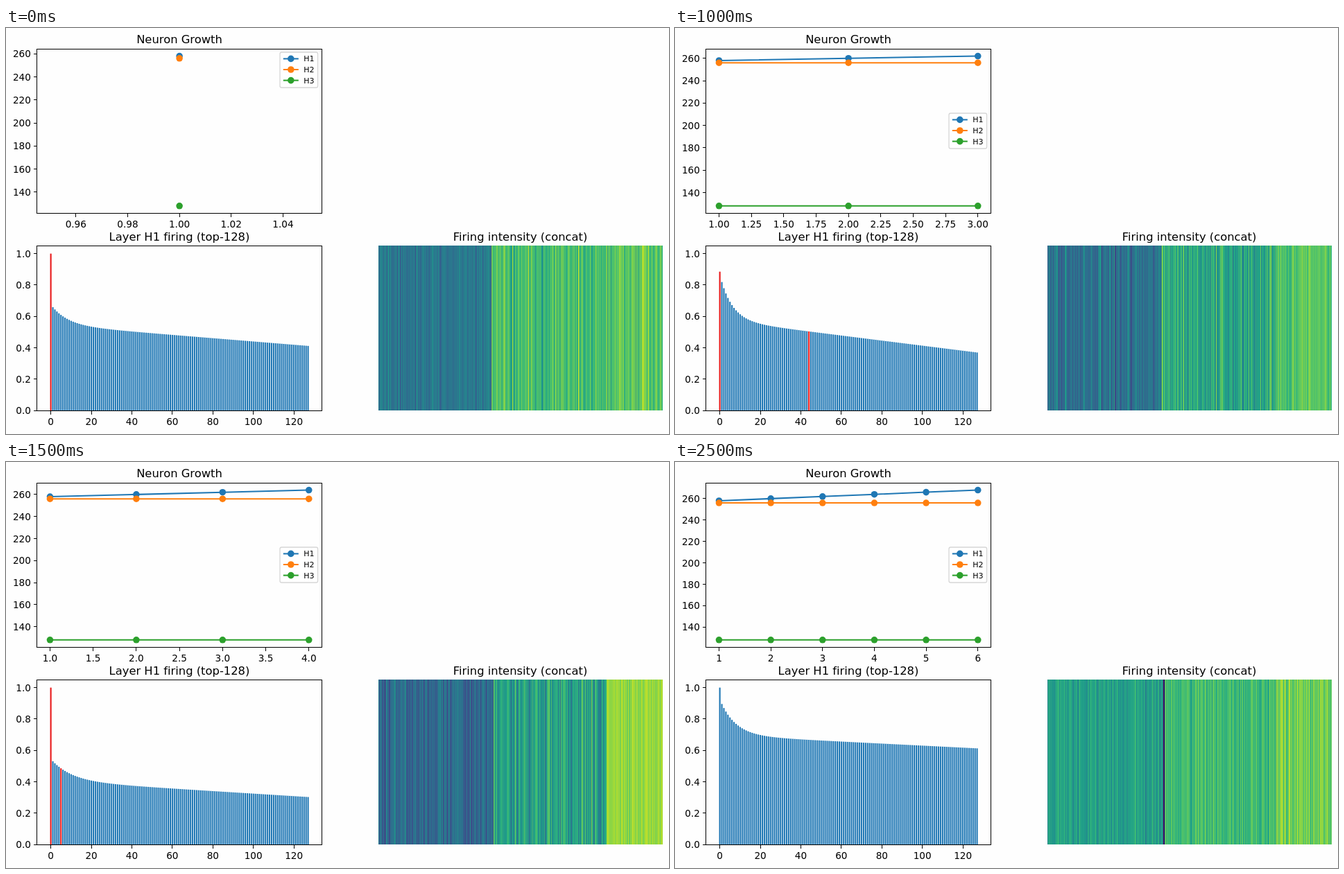
Animation of 956x586 px, one loop 3000 ms. Source, as an HTML page:

```html
<!DOCTYPE html>
<html lang="en">
<head>
<meta charset="utf-8">
<title>Neuron growth</title>
<style>
  html, body { margin: 0; width: 100%; height: 100%; overflow: hidden; background: #fefefe; }
  #stage { position: relative; width: 956px; height: 586px; overflow: hidden; }
  #strip { display: flex; width: 5736px; animation: play 3s steps(6, end) infinite; }
  svg { flex: none; display: block; overflow: hidden; }
  text { font-family: "DejaVu Sans", sans-serif; font-size: 13.6px; font-variant-ligatures: none; }
  .title { font-size: 16.35px; text-anchor: middle; }
  .mid { text-anchor: middle; }
  .end { text-anchor: end; }
  .key { font-size: 11px; }
  .axis { fill: none; stroke: #000; stroke-width: 1.1; }
  .crisp { shape-rendering: crispEdges; }
  @keyframes play { to { transform: translateX(-5736px); } }
</style>
</head>
<body>
<div id="stage"><div id="strip"></div></div>
<script>
const LEFT = 44.8, WIDTH = 410.6, HEIGHT = 237.9;
const BLUE = '#1f77b4', RED = '#e8191a';
const COLORS = [BLUE, '#ff7f0e', '#2ca02c'];
const VIRIDIS = ['440154', '482878', '3e4a89', '31688e', '26828e',
                 '1f9e89', '35b779', '6ece58', 'b5de2b', 'fde725']
  .map(h => [0, 2, 4].map(i => parseInt(h.substr(i, 2), 16)));

// bars: first bar, then a line from start to end plus a decaying boost
// layers: mean and spread of the firing; fresh: firing of the two newest neurons
const STEPS = [
  { bars: { first: 1, start: .545, end: .412, boost: .13, decay: 8 }, red: [0],
    layers: [[.4, .055], [.69, .075], [.73, .08]], fresh: .78 },
  { bars: { first: 1, start: .63, end: .455, boost: .28, decay: 4 }, red: [],
    layers: [[.45, .1], [.65, .095], [.69, .1]], fresh: .02 },
  { bars: { first: .885, start: .575, end: .37, boost: .29, decay: 6 }, red: [0, 44],
    layers: [[.38, .08], [.6, .09], [.73, .05]], fresh: .85 },
  { bars: { first: 1, start: .405, end: .303, boost: .14, decay: 10 }, red: [0, 5],
    layers: [[.33, .075], [.57, .1], [.84, .04]], fresh: .75 },
  { bars: { first: .98, start: .66, end: .52, boost: .335, decay: 17 }, red: [],
    layers: [[.5, .08], [.63, .08], [.7, .08]], fresh: .1 },
  { bars: { first: 1, start: .695, end: .613, boost: .23, decay: 7.5 }, red: [],
    layers: [[.565, .06], [.685, .065], [.78, .06]], fresh: .03 }
];

const n2 = v => +v.toFixed(2);
const text = (s, x, y, cls) => `<text x="${n2(x)}" y="${n2(y)}" class="${cls}">${s}</text>`;
const line = (d, color) => `<path d="${d}" fill="none" stroke="${color}" stroke-width="2.05"/>`;
const dot = (x, y, color) => `<circle cx="${n2(x)}" cy="${n2(y)}" r="4.78" fill="${color}"/>`;
const layerSizes = k => [258 + 2 * k, 256, 128];

// Smallest round step that gives at most nine intervals
function ticks(lo, hi) {
  let step;
  for (let p = .01; !step; p *= 10) step = [1, 2, 2.5, 5].map(m => m * p).find(s => (hi - lo) / s <= 9);
  const digits = (String(n2(step)).split('.')[1] || '').length;
  const out = [];
  for (let i = Math.ceil(lo / step); i * step <= hi; i++) out.push([i * step, (i * step).toFixed(digits)]);
  return out;
}

function plot(title, top, [x0, x1], [y0, y1]) {
  const bottom = top + HEIGHT, base = Math.floor(bottom) + .5, roof = Math.ceil(top) - .5 + (top < 100);
  const X = v => LEFT + (v - x0) / (x1 - x0) * WIDTH;
  const Y = v => bottom - (v - y0) / (y1 - y0) * HEIGHT;
  let axes = text(title, 250, top + 7.6 < 100 ? 22 : 306.7, 'title');
  for (const [v, label] of ticks(x0, x1)) {
    axes += `<path class="axis crisp" d="M${Math.floor(X(v)) + .5} ${base}v5"/>` + text(label, X(v), base + 20.9, 'mid');
  }
  for (const [v, label] of ticks(y0, y1)) {
    axes += `<path class="axis crisp" d="M44.5 ${Math.floor(Y(v)) + .5}h-5"/>` + text(label, 35.9, Y(v) + 5.1, 'end');
  }
  axes += `<rect class="axis crisp" x="44.5" y="${roof}" width="411" height="${base - roof}"/>`;
  return { X, Y, axes };
}

function legend(top) {
  let out = `<rect x="395" y="${top}" width="54.6" height="51" rx="2.6" fill="#fff" fill-opacity=".8" stroke="#ccc" stroke-opacity=".8" stroke-width="1.3"/>`;
  COLORS.forEach((c, i) => {
    const y = top + 9.4 + i * 15.6;
    out += line(`M399.8 ${y}H421.8`, c) + dot(410.8, y, c) + text('H' + (i + 1), 429.3, y + 4, 'key');
  });
  return out;
}

function growth(k) {
  const max = 258 + 2 * k, pad = (max - 128) * .05, side = k ? .05 * k : .055;
  const { X, Y, axes } = plot('Neuron Growth', 29.7, [1 - side, 1 + k + side], [128 - pad, max + pad]);
  let out = axes;
  COLORS.forEach((color, s) => {
    const pts = Array.from({ length: k + 1 }, (_, i) => [n2(X(i + 1)), n2(Y(layerSizes(i)[s]))]);
    if (k) out += line('M' + pts.join('L'), color);
    out += pts.map(p => dot(...p, color)).join('');
  });
  return out + legend(k ? 123 : 35);
}

function firing({ bars, red }) {
  const { X, Y, axes } = plot('Layer H1 firing (top-128)', 314.3, [-6.79, 133.79], [0, 1.05]);
  const { first, start, end, boost, decay } = bars;
  let out = '';
  for (let i = 0; i < 128; i++) {
    const h = i ? start + (end - start) * i / 127 + boost * Math.exp(-i / decay) : first;
    out += `<rect x="${n2(X(i) - 1.05)}" y="${n2(Y(h))}" width="2.1" height="${n2(Y(0) - Y(h))}" fill="${red.includes(i) ? RED : BLUE}"/>`;
  }
  return out + axes;
}

function random(seed) {
  return () => {
    seed = (seed * 1664525 + 1013904223) >>> 0;
    return seed / 4294967296;
  };
}

function viridis(v) {
  const p = Math.min(.9999, Math.max(0, v)) * 9, i = Math.floor(p);
  return `rgb(${VIRIDIS[i].map((c, j) => Math.round(c + (VIRIDIS[i + 1][j] - c) * (p - i)))})`;
}

function intensity({ layers, fresh }, k) {
  const rnd = random(977 * k + 41);
  const noise = () => (rnd() + rnd() + rnd() + rnd() - 2) * 1.73;
  const [h1, h2, h3] = layerSizes(k);
  let out = text('Firing intensity (concat)', 741.6, 306.7, 'title') + '<g class="crisp">';
  for (let x = 0; x < 410; x++) {
    const n = Math.floor((x + .5) / 410 * (h1 + h2 + h3));
    const [mean, spread] = layers[n < h1 ? 0 : n < h1 + h2 ? 1 : 2];
    const v = n < h1 && n >= h1 - 2 ? fresh : mean + noise() * spread;
    out += `<rect x="${537 + x}" y="314" width="1" height="238" fill="${viridis(v)}"/>`;
  }
  return out + '</g>';
}

document.getElementById('strip').innerHTML = STEPS.map((step, k) =>
  `<svg width="956" height="586" viewBox="0 0 956 586">${growth(k)}${firing(step)}${intensity(step, k)}</svg>`
).join('');
</script>
</body>
</html>
```
